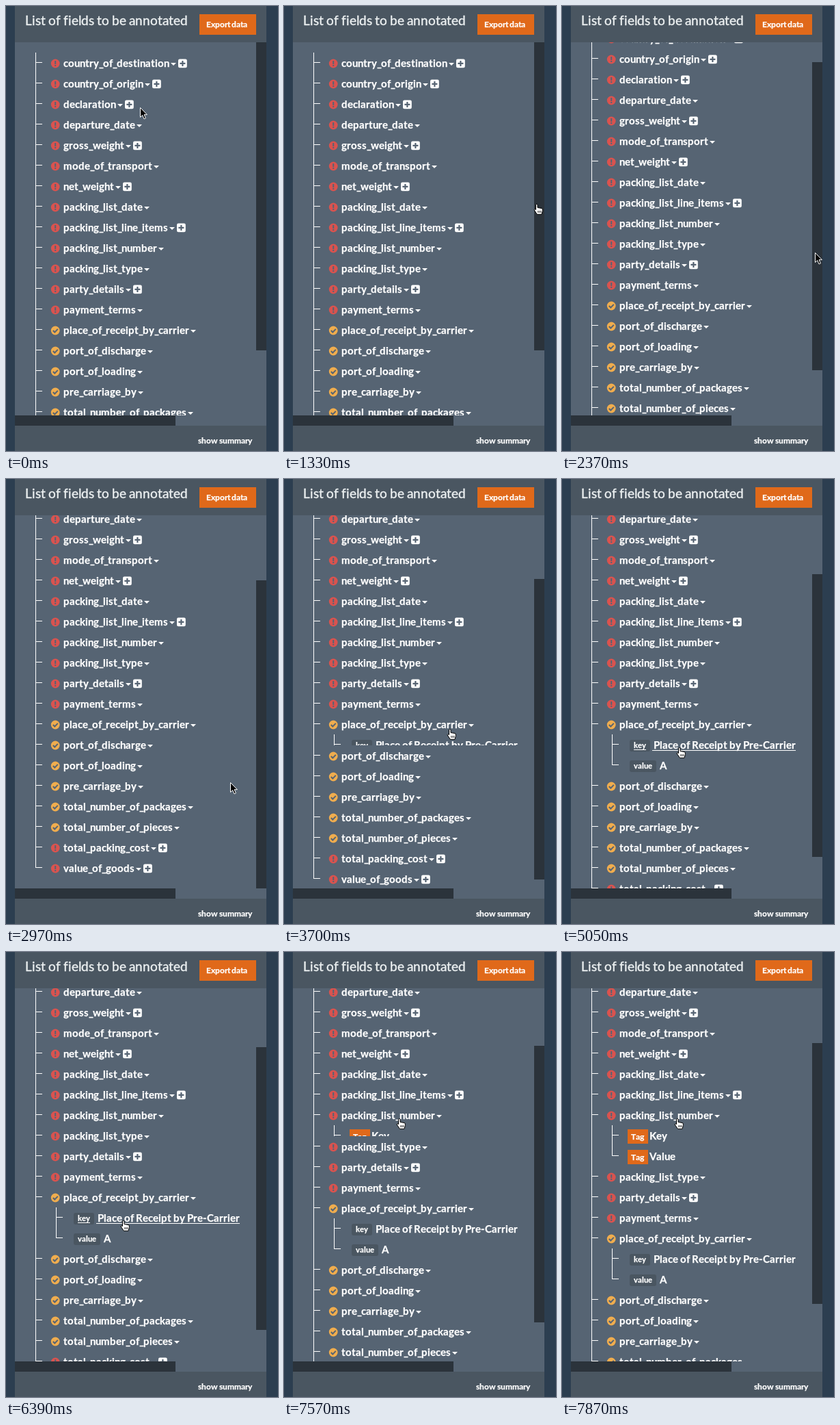
Recreate the animation shown at these times as an HTML page. Size 398 by 650 pixels, loop 8000 ms.

```html
<!DOCTYPE html>
<html lang="en">
<head>
<meta charset="utf-8">
<title>Fields to annotate</title>
<style>
  html, body { margin: 0; width: 100%; height: 100%; overflow: hidden; background: #2c3e50; }
  svg { display: block; }
  svg svg { overflow: hidden; }
  text {
    font-family: Lato, "Open Sans", sans-serif;
    font-kerning: none;
    font-variant-ligatures: none;
    fill: #fff;
    stroke: #fff;
    stroke-width: .25px;
  }
  .title { fill: #ecf0f1; stroke: #ecf0f1; stroke-width: .4px; }
</style>
</head>
<body>
<script>
const LOOP = 8000, STEP = 148.6, LEAD = 16;
const ROW = 30, VIEW = 545, TOP = 53, MAX_SCROLL = 115;
const LIST = '#566473', BAR = '#4a5661', DARK = '#2b333b', ORANGE = '#e0691a';

const NS = 'http://www.w3.org/2000/svg';
const ctx = document.createElement('canvas').getContext('2d');

function add(parent, tag, attrs = {}) {
  const el = document.createElementNS(NS, tag);
  for (const name in attrs) el.setAttribute(name, attrs[name]);
  return parent.appendChild(el);
}
const rect = (p, x, y, width, height, fill, rx = 0) =>
  add(p, 'rect', { x, y, width, height, fill, rx });
const path = (p, d, fill, stroke = 'none', width = 1) =>
  add(p, 'path', { d, fill, stroke, 'stroke-width': width });

// Sets text with whole-pixel advances (gaps round down); returns the x where it ends.
function write(p, str, x, y, size, weight = 700) {
  ctx.font = `${weight} 100px Lato, "Open Sans", sans-serif`;
  const xs = [];
  for (const ch of str) {
    xs.push(x);
    const advance = ctx.measureText(ch).width * size / 100;
    x += /[ _]/.test(ch) ? Math.floor(advance) : Math.round(advance);
  }
  const el = add(p, 'text', { x: xs.join(' '), y, 'font-size': size, 'font-weight': weight });
  if (weight < 700) el.setAttribute('class', 'title');
  el.textContent = str;
  return x;
}

const stage = add(document.body, 'svg', { width: 398, height: 650, viewBox: '0 0 398 650' });
rect(stage, 13, 0, 368, 650, BAR);
rect(stage, 13, TOP, 368, 560, LIST);
rect(stage, 13, 598, 235, 15, DARK);
const thumb = rect(stage, 366, TOP, 15, 450, DARK);

write(stage, 'List of fields to be annotated', 28, 28, 19, 400);
rect(stage, 283, 12, 83, 30, ORANGE);
write(stage, 'Export data', 293, 31, 12);
write(stage, 'show summary', 281, 639, 12);

const view = add(stage, 'svg', { x: 0, y: TOP, width: 366, height: VIEW });
const content = add(view, 'g');
const trunk = rect(content, 43, 15, 1, 0, '#fff');

// Marks: "+" has sub-fields, "*" is done.
const fields = `country_of_destination+ country_of_origin+ declaration+ departure_date
  gross_weight+ mode_of_transport net_weight+ packing_list_date packing_list_line_items+
  packing_list_number packing_list_type party_details+ payment_terms
  place_of_receipt_by_carrier* port_of_discharge* port_of_loading* pre_carriage_by*
  total_number_of_packages* total_number_of_pieces* total_packing_cost+ value_of_goods+`
  .split(/\s+/);

function status(p, done) {
  add(p, 'circle', { cx: 72.2, cy: 16, r: 6.4, fill: done ? '#f0ad4e' : '#d9534f' });
  if (done) path(p, 'M68.8 16l2.5 2.5 4.5-4.6', 'none', LIST, 2);
  else path(p, 'M72.2 12v5m0 1.1v2', 'none', LIST, 2);
}

function makeRow(mark) {
  const g = add(content, 'g');
  rect(g, 43, 14, 10, 1, '#fff');
  status(g, mark.endsWith('*'));
  const end = write(g, mark.replace(/[+*]/, ''), 84, 21, 15);
  path(g, `M${end + 2} 15h8l-4 4z`, '#fff');
  if (mark.endsWith('+')) {
    rect(g, end + 13, 9.5, 12.8, 12.8, '#fff', 2.2);
    path(g, `M${end + 15.4} 15.9h8m-4-4v8`, 'none', LIST, 2.2);
  }
  return g;
}
const rows = fields.map(makeRow);

function makeBranch(parent) {
  const box = add(content, 'svg', { x: 0, width: 366, height: 0 });
  rect(box, 73, 0, 1, ROW + 15, '#fff');
  for (const y of [0, ROW]) rect(box, 73, y + 14, 10, 1, '#fff');
  return { box, parent: fields.findIndex(f => f.startsWith(parent)), open: 0 };
}

function badge(p, name, value, y) {
  const plate = rect(p, 99, y + 8, 0, 17, BAR, 3);
  const end = write(p, name, 105, y + 20, 11.25);
  plate.setAttribute('width', end + 6 - 99);
  return [end, write(p, value, end + 11, y + 21, 15)];
}

function tag(p, name, y) {
  rect(p, 96, y + 6, 30, 21, ORANGE);
  write(p, 'Tag', 101, y + 21, 12);
  write(p, name, 128, y + 21, 15);
}

const number = makeBranch('packing_list_number');
tag(number.box, 'Key', 0);
tag(number.box, 'Value', ROW);

const place = makeBranch('place_of_receipt');
const [nameEnd, valueEnd] = badge(place.box, 'key', 'Place of Receipt by Pre-Carrier', 0);
badge(place.box, 'value', 'A', ROW);
const underline = add(place.box, 'g');
rect(underline, 105, 22, nameEnd - 105, 1, '#fff');
rect(underline, nameEnd + 9, 23, valueEnd - nameEnd - 9, 1, '#fff');

const pointer = add(stage, 'g');
const arrow = path(pointer, 'M.5.5v14l3.2-3 2.3 5.4 2.4-1-2.3-5.2h4.3z', '#000', '#fff');
const hand = add(pointer, 'g');
path(hand, 'M3.5 9.5V2.2q1.25-1.6 2.5 0v4.3l6 1q1.3.3 1.3 1.5v2.5l-1.3 4.8H5.3L1 9.8q.6-2 2.5-.3z',
  '#fff', '#000');
path(hand, 'M6.8 11v3m2-3v3m2-3v3', 'none', '#000', .8);

// Pointer trips, timed in steps.
const trips = [
  { from: 0, to: 5, x: 134, y: 462 },
  { from: 5, to: 9, x: 365, y: 288, hand: true },
  { from: 9, to: 16, x: 370, y: 360 },
  { from: 16, to: 20, x: 328, y: 443 },
  { from: 20, to: 25, x: 238, y: 364, hand: true },
  { from: 28, to: 31, x: 167, y: 391, hand: true },
  { from: 43, to: 49, x: 164, y: 242, hand: true }
];

const ramp = (k, from, to) => Math.min(1, Math.max(0, (k - from) / (to - from)));
const ease = u => u * u * (3 - 2 * u);
const show = (el, on) => el.setAttribute('visibility', on ? 'visible' : 'hidden');
const shift = (el, x, y) => el.setAttribute('transform', `translate(${x} ${y})`);

function movePointer(k) {
  let x = 196, y = 148, isHand = false;
  for (const trip of trips) {
    if (k <= trip.from) break;
    const u = ease(ramp(k, trip.from, trip.to));
    x += (trip.x - x) * u;
    y += (trip.y - y) * u;
    isHand = !!trip.hand && u > .8 || isHand && u < .1 || trip.from > 25;
  }
  shift(pointer, Math.round(x), Math.round(y));
  show(hand, isHand);
  show(arrow, !isHand);
  return y;
}

function layout() {
  let y = 15;
  rows.forEach((row, i) => {
    shift(row, 0, y);
    y += ROW;
    for (const { box, parent, open } of [number, place]) {
      if (parent !== i) continue;
      const height = Math.round(open * 2 * ROW);
      box.setAttribute('y', y);
      box.setAttribute('height', height);
      show(box, height > 0);
      y += height;
    }
  });
  trunk.setAttribute('height', y - ROW);
  return y + 15;
}

function draw(time) {
  const k = Math.floor((time % LOOP + LEAD) / STEP);
  place.open = ease(ramp(k, 24, 27));
  number.open = ease(ramp(k, 50, 53));

  const total = layout();
  const scroll = Math.round(MAX_SCROLL * ramp(k, 13, 20) ** 1.37);
  shift(content, 0, -scroll);

  const size = Math.round(VIEW * VIEW / total);
  thumb.setAttribute('y', TOP + Math.floor(scroll * (VIEW - size) / (total - VIEW)));
  thumb.setAttribute('height', size);

  const y = movePointer(k);
  underline.setAttribute('display', place.open === 1 && y > 376 ? 'inline' : 'none');
}

const start = performance.now();
function tick() {
  draw(performance.now() - start);
  requestAnimationFrame(tick);
}
tick();
</script>
</body>
</html>
```
